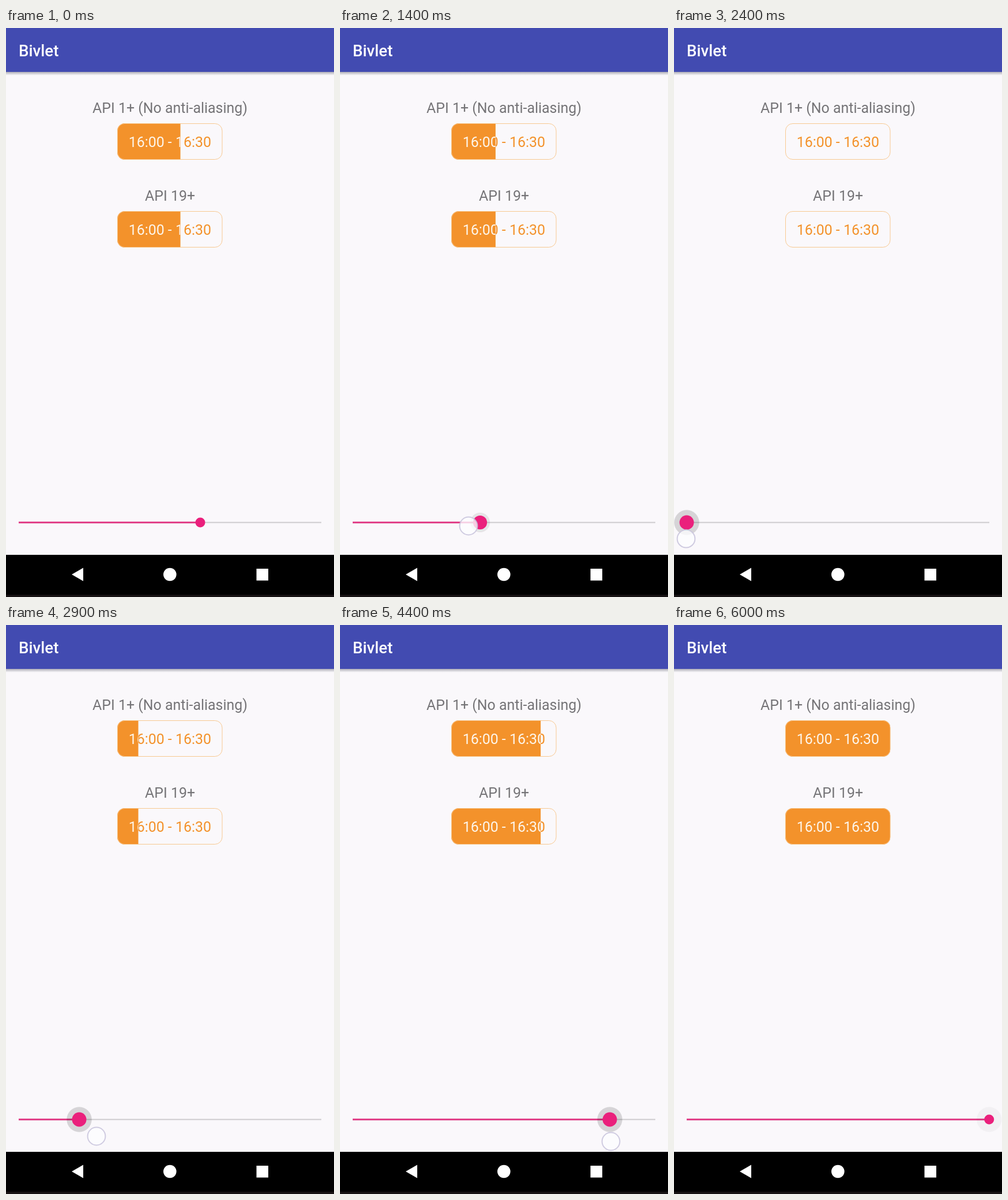
Write an HTML page with a canvas that moves like this. It is 569x985 px and loops after 6100 ms.

```html
<!DOCTYPE html>
<html lang="en">
<head>
<meta charset="utf-8">
<title>Progress buttons</title>
<style>
  html, body { margin: 0; width: 100%; height: 100%; overflow: hidden; background: #faf8fb; }
  canvas { display: block; }
</style>
</head>
<body>
<canvas id="stage" width="569" height="985"></canvas>
<script>
const ctx = document.getElementById('stage').getContext('2d');
const LOOP = 6100, STEP = 100, LAG = 65;
const TRACK = { left: 22, right: 547, y: 856 };
const ORANGE = '#f3922b', PINK = '#ea207c', PAGE = '#faf8fb';

// [time, position] of the finger
const pathX = [[1050, 337], [1335, 243], [1400, 223], [1835, 85], [1900, 64], [2000, 36],
  [2100, 24], [2300, 21], [2600, 21], [2700, 62], [2835, 127], [2900, 157], [3300, 335],
  [3535, 394], [3600, 407], [4000, 453], [4335, 468], [4400, 470], [4700, 488], [5300, 550]];
const pathY = [[1050, 857], [1400, 862], [1900, 883], [2900, 885], [3600, 888],
  [4400, 894], [4700, 901], [5200, 908]];

const clamp = (v, lo, hi) => Math.min(hi, Math.max(lo, v));
const ramp = (t, from, to) => clamp((t - from) / (to - from), 0, 1);

// Monotone cubic interpolation, flat beyond both ends
function follow(keys, t) {
  const last = keys.length - 1;
  if (t <= keys[0][0]) return keys[0][1];
  if (t >= keys[last][0]) return keys[last][1];
  const slope = i => (keys[i + 1][1] - keys[i][1]) / (keys[i + 1][0] - keys[i][0]);
  const tangent = i => {
    if (i === 0 || i === last) return 0;
    const a = slope(i - 1), b = slope(i);
    return a * b <= 0 ? 0 : 2 * a * b / (a + b);
  };
  const i = keys.findIndex(k => k[0] > t) - 1;
  const span = keys[i + 1][0] - keys[i][0], u = (t - keys[i][0]) / span;
  const v = 1 - u;
  return v * v * (1 + 2 * u) * keys[i][1] + u * u * (3 - 2 * u) * keys[i + 1][1]
    + span * u * v * (v * tangent(i) - u * tangent(i + 1));
}

function rect(x, y, w, h, color) {
  ctx.fillStyle = color;
  ctx.fillRect(x, y, w, h);
}

function disc(x, y, r, color) {
  ctx.beginPath();
  ctx.arc(x, y, r, 0, 7);
  ctx.fillStyle = color;
  ctx.fill();
}

function text(str, x, y, color, font = '24.92px', align = 'center') {
  ctx.font = font + ' Roboto, sans-serif';
  ctx.textAlign = align;
  ctx.fillStyle = color;
  ctx.fillText(str, x, y);
}

function button(top, progress) {
  const left = 193, width = 182.5, height = 63, label = '16:00 - 16:30';
  const outline = inset => {
    ctx.beginPath();
    ctx.roundRect(left + inset, top + inset, width - 2 * inset, height - 2 * inset, 13 - inset);
  };
  text(label, 284.3, top + 41.3, ORANGE);
  ctx.save();
  outline(0);
  ctx.clip();
  ctx.beginPath();
  ctx.rect(left, top, width * progress, height);
  ctx.clip();
  rect(left, top, width, height, ORANGE);
  text(label, 284.3, top + 41.3, '#fdf5ea');
  ctx.restore();
  outline(0.5);
  ctx.lineWidth = 1;
  ctx.strokeStyle = 'rgba(248, 196, 134, .9)';
  ctx.stroke();
}

function header() {
  const shade = ctx.createLinearGradient(0, 76, 0, 82);
  shade.addColorStop(0, 'rgba(60, 60, 80, .4)');
  shade.addColorStop(1, 'rgba(60, 60, 80, 0)');
  rect(0, 76, 569, 6, shade);
  rect(0, 0, 569, 76, '#424bb1');
  text('Bivlet', 22, 48.6, '#fff', '500 27.7px', 'left');
}

function navigation() {
  rect(0, 912, 569, 73, '#000');
  rect(0, 981, 569, 4, '#161213');
  ctx.beginPath();
  ctx.moveTo(114, 946);
  ctx.lineTo(134, 934.5);
  ctx.lineTo(134, 957.5);
  ctx.fillStyle = '#fff';
  ctx.fill();
  disc(284.3, 946, 11.3, '#fff');
  rect(434.5, 936, 20.5, 20.5, '#fff');
}

function slider(t, x) {
  const { left, right, y } = TRACK;
  const grow = ramp(t, 1220, 1420) * (1 - ramp(t, 5650, 5850));
  const spread = ramp(t, 1180, 1460);
  const shade = 0.145 * ramp(t, 1180, 1560) * (1 - ramp(t, 5650, 6100));
  rect(left, y - 1.2, right - left, 2.4, '#d4d2d5');
  rect(left, y - 1.4, x - left, 2.8, '#e0307f');
  if (shade > 0) disc(x, y, 21.7 * spread, `rgba(0, 0, 0, ${shade})`);
  disc(x, y, 8.5 + 4 * grow, PINK);
}

function finger(t) {
  const alpha = ramp(t, 600, 800) * (1 - ramp(t, 5600, 5800));
  if (!alpha) return;
  ctx.save();
  ctx.globalAlpha = alpha;
  disc(follow(pathX, t), follow(pathY, t), 15.4, 'rgba(253, 252, 255, .78)');
  ctx.lineWidth = 2;
  ctx.strokeStyle = 'rgba(200, 196, 220, .85)';
  ctx.stroke();
  ctx.restore();
}

function draw(t) {
  const thumb = clamp(follow(pathX, t - LAG), TRACK.left, TRACK.right - 0.3);
  const progress = ramp(thumb, TRACK.left, TRACK.right - 0.3);
  rect(0, 0, 569, 985, PAGE);
  header();
  text('API 1+ (No anti-aliasing)', 284.5, 147.2, '#757477');
  button(165, progress);
  text('API 19+', 284.5, 299.4, '#757477');
  button(317, progress);
  slider(t, thumb);
  navigation();
  finger(t);
}

const start = performance.now();
function tick() {
  const t = (performance.now() - start) % LOOP;
  draw(Math.floor(t / STEP) * STEP);
  requestAnimationFrame(tick);
}
tick();
</script>
</body>
</html>
```
